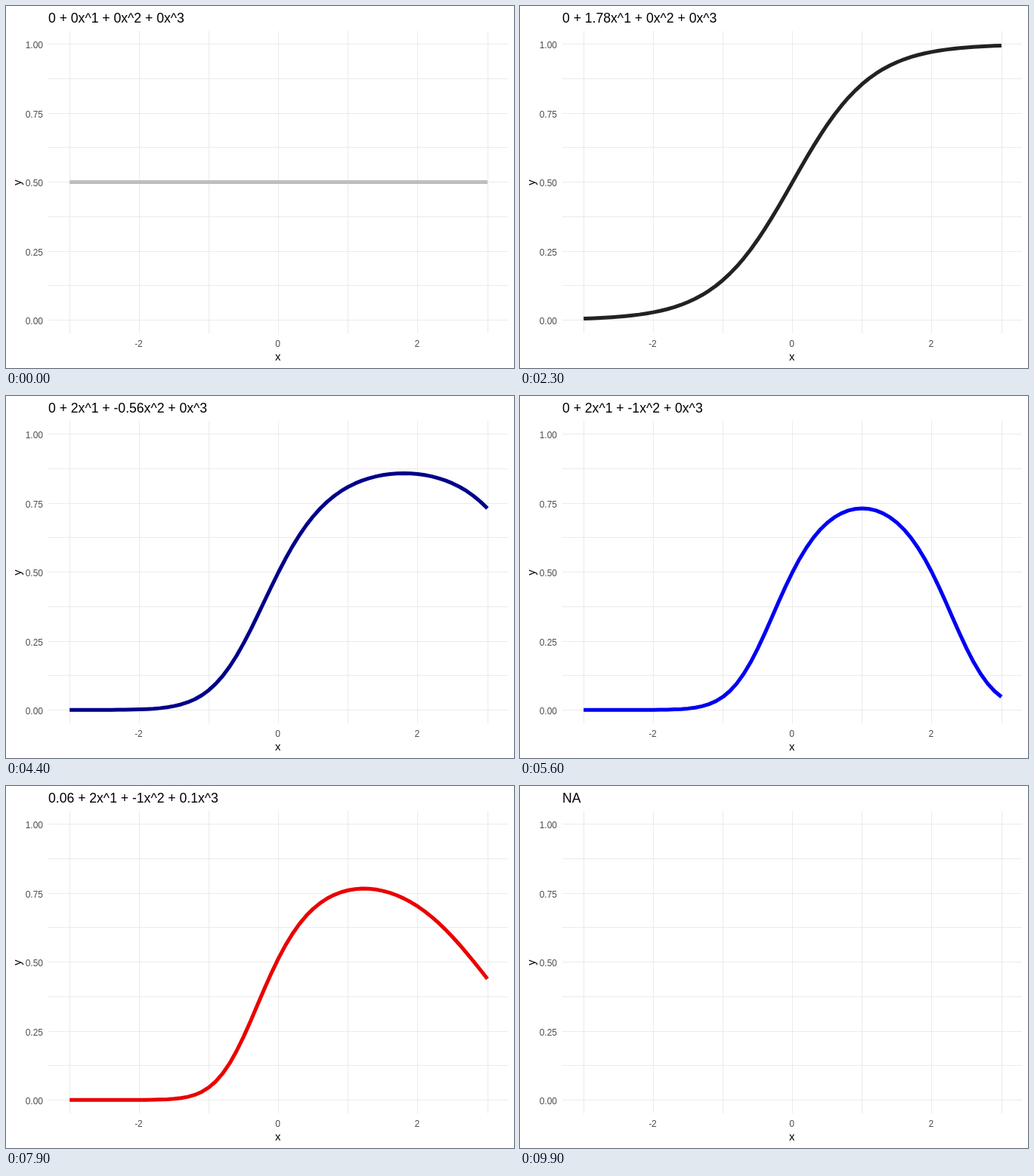
Write an HTML page with a canvas that moves like this. It is 672 px wide and 480 px high and loops after 10000 ms.

```html
<!DOCTYPE html>
<html lang="en">
<head>
<meta charset="utf-8">
<title>Logistic polynomial</title>
<style>
  html, body { margin: 0; width: 100%; height: 100%; overflow: hidden; background: #fff; }
  canvas { display: block; }
</style>
</head>
<body>
<canvas id="stage" width="672" height="480"></canvas>
<script>
const ctx = document.getElementById('stage').getContext('2d');
const LOOP = 10000;
const PANEL = { left: 56, top: 33, right: 664, bottom: 434 };
const FONT = '"Liberation Sans", Arial, sans-serif';

// Terms grow one after another: x, x^2, x^3, then the intercept.
const FINAL = [0.5, 2, -1, 0.1];
const TERM_ORDER = [1, 2, 3, 0];
const STEPS = 10;
const LAST = STEPS * FINAL.length - 1;
const RAMP = [[190, 190, 190], [0, 0, 0], [0, 0, 255], [255, 0, 0], [139, 0, 0]];

const toX = x => 360.2 + 92.12 * x;
const toY = p => 233.1 + 365.6 * (0.5 - p);

function stateAt(time) {
  if (time >= 9900) return null;
  if (time < 200) return 0;
  const state = time < 5900
    ? 1 + Math.floor((time - 200) / 300)
    : 20 + Math.floor((time - 5900) / 200);
  // States that start a new term look like their neighbour.
  if (state === 10 || state === 20) return state - 1;
  return state === 30 ? 31 : state;
}

function coefficients(state) {
  const result = [0, 0, 0, 0];
  TERM_ORDER.forEach((term, order) => {
    const step = Math.min(Math.max(state - order * STEPS, 0), STEPS - 1);
    result[term] = FINAL[term] * step / (STEPS - 1);
  });
  return result;
}

function rampColor(state) {
  const position = state / LAST * (RAMP.length - 1);
  const index = Math.min(Math.floor(position), RAMP.length - 2);
  const mix = position - index;
  const rgb = RAMP[index].map((c, k) => Math.round(c + (RAMP[index + 1][k] - c) * mix));
  return `rgb(${rgb})`;
}

function formula(coefs) {
  return coefs.map((c, power) => Number(c.toFixed(2)) + (power ? 'x^' + power : '')).join(' + ');
}

function text(label, x, y, size, color, align) {
  ctx.font = `${size}px ${FONT}`;
  ctx.fillStyle = color;
  ctx.textAlign = align;
  ctx.fillText(label, x, y);
}

function drawAxes() {
  ctx.fillStyle = '#ebebeb';
  for (let x = -3; x <= 3; x++) {
    ctx.fillRect(Math.round(toX(x)), PANEL.top, 1, PANEL.bottom - PANEL.top);
  }
  for (let k = 0; k <= 8; k++) {
    ctx.fillRect(PANEL.left, Math.round(toY(k / 8)), PANEL.right - PANEL.left, 1);
  }
  for (const x of [-2, 0, 2]) text(String(x), toX(x) - 0.5, 452, 12, '#4d4d4d', 'center');
  for (let k = 0; k <= 4; k++) {
    text((k / 4).toFixed(2), 49, Math.round(toY(k / 4)) + 6, 12, '#4d4d4d', 'right');
  }
  text('x', 359.7, 470, 14.67, '#000', 'center');
  ctx.save();
  ctx.translate(19.5, 234);
  ctx.rotate(-Math.PI / 2);
  text('y', 0, 0, 14.67, '#000', 'center');
  ctx.restore();
}

function drawCurve(coefs, color) {
  ctx.beginPath();
  for (let k = -30; k <= 30; k++) {
    const x = k / 10;
    const eta = coefs.reduce((sum, c, power) => sum + c * x ** power, 0);
    ctx.lineTo(toX(x) + 0.3, toY(1 / (1 + Math.exp(-eta))) + 0.4);
  }
  ctx.strokeStyle = color;
  ctx.lineWidth = 5;
  ctx.lineJoin = 'round';
  ctx.stroke();
}

function draw(time) {
  ctx.fillStyle = '#fff';
  ctx.fillRect(0, 0, 672, 480);
  drawAxes();
  const state = stateAt(time);
  let title = 'NA';
  if (state !== null) {
    const coefs = coefficients(state);
    drawCurve(coefs, rampColor(state));
    title = formula(coefs);
  }
  text(title, 56, 22, 17.6, '#000', 'left');
}

const start = performance.now();
function tick() {
  draw((performance.now() - start) % LOOP);
  requestAnimationFrame(tick);
}
tick();
</script>
</body>
</html>
```
